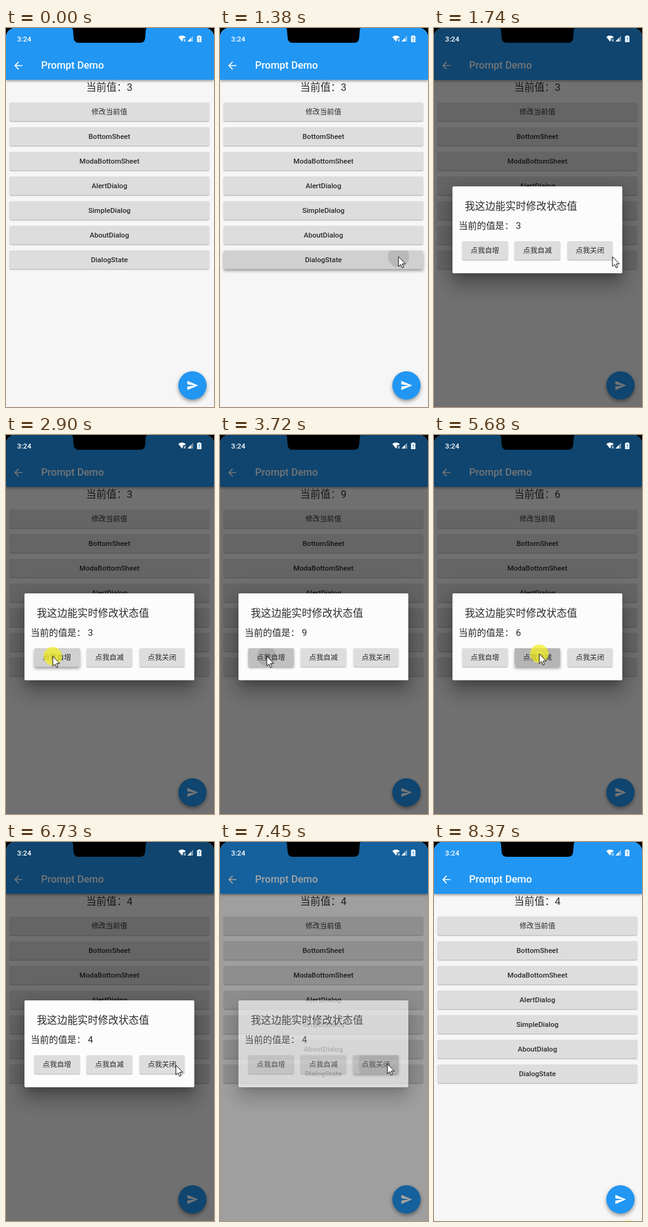
An HTML page that plays this animation: 338x615 px, repeating every 8600 ms.

```html
<!DOCTYPE html>
<html lang="zh-CN">
<head>
<meta charset="utf-8">
<style>
html, body { margin: 0; width: 100%; height: 100%; overflow: hidden; background: #000; }
body { font-family: Roboto, "Noto Sans CJK SC", sans-serif; color: #2b2b2b; }
div, svg { position: absolute; }
div { white-space: pre; }
#stage { left: 0; top: 0; width: 338px; height: 615px; overflow: hidden; }
#page { inset: 0; background: #f6f6f6; border-radius: 15px 15px 0 0; overflow: hidden; }
#bar { left: 0; top: 0; width: 338px; height: 84px; background: #2196f3; box-shadow: 0 2px 4px #0006; }
#title { left: 57px; top: 50px; font: 500 16.5px/22px Roboto, sans-serif; color: #fff; }
#total { left: 0; width: 336px; top: 85px; text-align: center; font-size: 16.5px; line-height: 24px; }
.button { height: 30px; line-height: 30px; border-radius: 2px; background-color: #ddd;
  text-align: center; font-size: 11.6px; }
.latin { font-weight: 500; }
#fab { left: 280px; top: 557px; width: 46px; height: 46px; border-radius: 50%; background: #2196f3;
  box-shadow: 0 3px 6px #0006; }
#barrier { inset: 0; background: #000; border-radius: 15px 15px 0 0; }
#dialog { left: 30px; top: 257px; width: 276px; height: 141px; border-radius: 2px; background: #fcfcfc;
  box-shadow: 0 9px 12px -5px #0003, 0 18px 28px 2px #0003, 0 7px 34px 6px #0002; }
#heading { left: 20px; top: 21px; font-size: 16.6px; line-height: 24px; }
#count { left: 10px; top: 52px; font-size: 14.9px; line-height: 24px; }
#clock { left: 18px; top: 10px; font: 500 11.7px/16px Roboto, sans-serif; color: #fff; }
#halo { width: 30px; height: 30px; margin: -15px; border-radius: 50%; background: #f2ee1eb8; }
</style>
</head>
<body>
<div id="stage">
  <div id="page">
    <div id="bar">
      <svg style="left:10px;top:51px" width="20" height="20" viewBox="0 0 24 24" fill="#fff"><path d="M20 11H7.8l5.6-5.6L12 4l-8 8 8 8 1.4-1.4L7.8 13H20z"/></svg>
      <div id="title">Prompt Demo</div>
    </div>
    <div id="total"></div>
    <div id="fab">
      <svg style="left:13px;top:13px" width="20" height="20" viewBox="0 0 24 24" fill="#fff"><path d="M2 21 23 12 2 3v7l15 2-15 2z"/></svg>
    </div>
  </div>
  <div id="barrier"></div>
  <div id="dialog">
    <div id="heading">我这边能实时修改状态值</div>
    <div id="count"></div>
  </div>
  <div id="clock">3:24</div>
  <svg width="338" height="30" style="left:0;top:0" fill="#fff">
    <path fill="#000" d="M107 0h122q-2 1-2 5l-1 12q-1 7-8 7H118q-7 0-8-7L109 5q0-4-2-5z"/>
    <path d="M280 14.5q6-4.500 12 0l-1.500 2h-3v3l-1.500 2.500z"/>
    <path d="m289 18 3 4m0-4-3 4" stroke="#fff"/>
    <path opacity=".45" d="M304 12.500V22h-9z"/>
    <path d="M300.500 16V22H295z"/>
    <path d="M312.500 12h3v1h2v10h-7V13h2z"/>
    <path fill="#2196f3" d="M313.300 15h1.500v3.800h-1.500zM313.300 20h1.500v1.400h-1.500z"/>
  </svg>
  <div id="halo"></div>
  <svg id="cursor" width="14" height="22" viewBox="-1 -1 14 22"><path d="M0 0V16L3.700 12.600 6 18.300 8.500 17.200 6.200 11.800H11.300Z" fill="#fff" stroke="#111"/></svg>
</div>
<script>
const LOOP = 8600;
const $ = id => document.getElementById(id);
const ramp = (t, a, b) => Math.min(1, Math.max(0, (t - a) / (b - a)));
const smooth = p => p * p * (3 - 2 * p);
const easeOut = p => 1 - (1 - p) ** 2;

function addButton(parent, label, left, top, width) {
  const el = document.createElement('div');
  el.className = /^[A-Z]/.test(label) ? 'button latin' : 'button';
  el.textContent = label;
  Object.assign(el.style, { left: left + 'px', top: top + 'px', width: width + 'px' });
  parent.append(el);
  return { el, left, top, presses: [] };
}

const pageButtons = ['修改当前值', 'BottomSheet', 'ModaBottomSheet', 'AlertDialog', 'SimpleDialog', 'AboutDialog', 'DialogState']
  .map((label, i) => addButton($('page'), label, 6, 121 + 40 * i, 324));
const dialogButtons = ['点我自增', '点我自减', '点我关闭']
  .map((label, i) => addButton($('dialog'), label, 16 + 85.3 * i, 89, 73.5));
const [plus, minus, close] = dialogButtons;
const opener = pageButtons[6];

// Repeated clicks: the first is held longer, the rest follow at a fixed period.
const clicks = (x, y, down, up, count = 1, period = 0) => Array.from({ length: count }, (_, i) =>
  ({ x, y, down: i ? up + period * i - period / 2 : down, up: up + period * i }));

opener.presses = clicks(290, 371, 1100, 1330);
plus.presses = clicks(76, 359, 2720, 2950, 7, 145);
minus.presses = clicks(171, 355, 4750, 5020, 6, 178);
close.presses = clicks(272, 360, 7110, 7310);
const allPresses = [opener, plus, minus, close].flatMap(b => b.presses)
  .concat(clicks(316, 629, 8370, LOOP));

// start, end, from, to, easing
const moves = [
  [80, 920, [267, 535], [290, 371], easeOut],
  [1850, 2470, [290, 371], [76, 359], smooth],
  [3870, 4470, [76, 359], [171, 355], smooth],
  [5950, 6330, [171, 355], [222, 397], smooth],
  [6330, 6730, [222, 397], [276, 362], smooth],
  [6730, 6830, [276, 362], [272, 360], smooth],
  [7600, 8070, [272, 360], [316, 629], smooth],
];

function cursorAt(t) {
  const [start, end, from, to, ease] = moves.findLast(m => t >= m[0]) || moves[0];
  const p = ease(ramp(t, start, end));
  return from.map((v, i) => v + (to[i] - v) * p);
}

function drawButton({ el, left, top, presses }, t, originX, originY) {
  let pressed = 0;
  const layers = [];
  for (const { x, y, down, up } of presses) {
    pressed = Math.max(pressed, ramp(t, down + 100, down + 160) * (1 - ramp(t, up + 100, up + 300)));
    const alpha = 0.11 * (1 - ramp(t, up + 140, up + 380));
    const r = 100 * ramp(t, up, up + 300);
    if (r && alpha) {
      const at = `${x - originX - left}px ${y - originY - top}px`;
      layers.push(`radial-gradient(circle at ${at}, rgba(0,0,0,${alpha}) ${r}px, transparent ${r + 0.7}px)`);
    }
  }
  const shade = `rgba(0,0,0,${0.06 * pressed})`;
  el.style.backgroundImage = [...layers, `linear-gradient(${shade}, ${shade})`].join();
  el.style.boxShadow = `0 ${1 + 2 * pressed}px ${2 + 3 * pressed}px rgba(0,0,0,${0.32 + 0.06 * pressed})`;
}

const place = (el, x, y) => { el.style.left = x + 'px'; el.style.top = y + 'px'; };
const done = (button, t) => button.presses.filter(p => t >= p.up).length;

function draw(t) {
  const value = 3 + done(plus, t) - done(minus, t);
  $('total').textContent = '当前值：' + value;
  $('count').textContent = '当前的值是： ' + value;

  const shown = ramp(t, 1460, 1610) * (1 - ramp(t, 7400, 7550));
  $('barrier').style.opacity = 0.54 * shown;
  $('dialog').style.opacity = shown;

  pageButtons.forEach(b => drawButton(b, t, 0, 0));
  dialogButtons.forEach(b => drawButton(b, t, 30, 257));

  const [x, y] = cursorAt(t);
  place($('cursor'), x - 1, y - 1);
  $('cursor').style.display = t >= 80 && t < 8090 ? '' : 'none';

  const press = allPresses.find(p => t >= p.down && t < p.up);
  $('halo').style.display = press ? '' : 'none';
  if (press) place($('halo'), press.x, press.y);
}

const begin = performance.now();
function frame() {
  draw((performance.now() - begin) % LOOP);
  requestAnimationFrame(frame);
}
frame();
</script>
</body>
</html>
```
